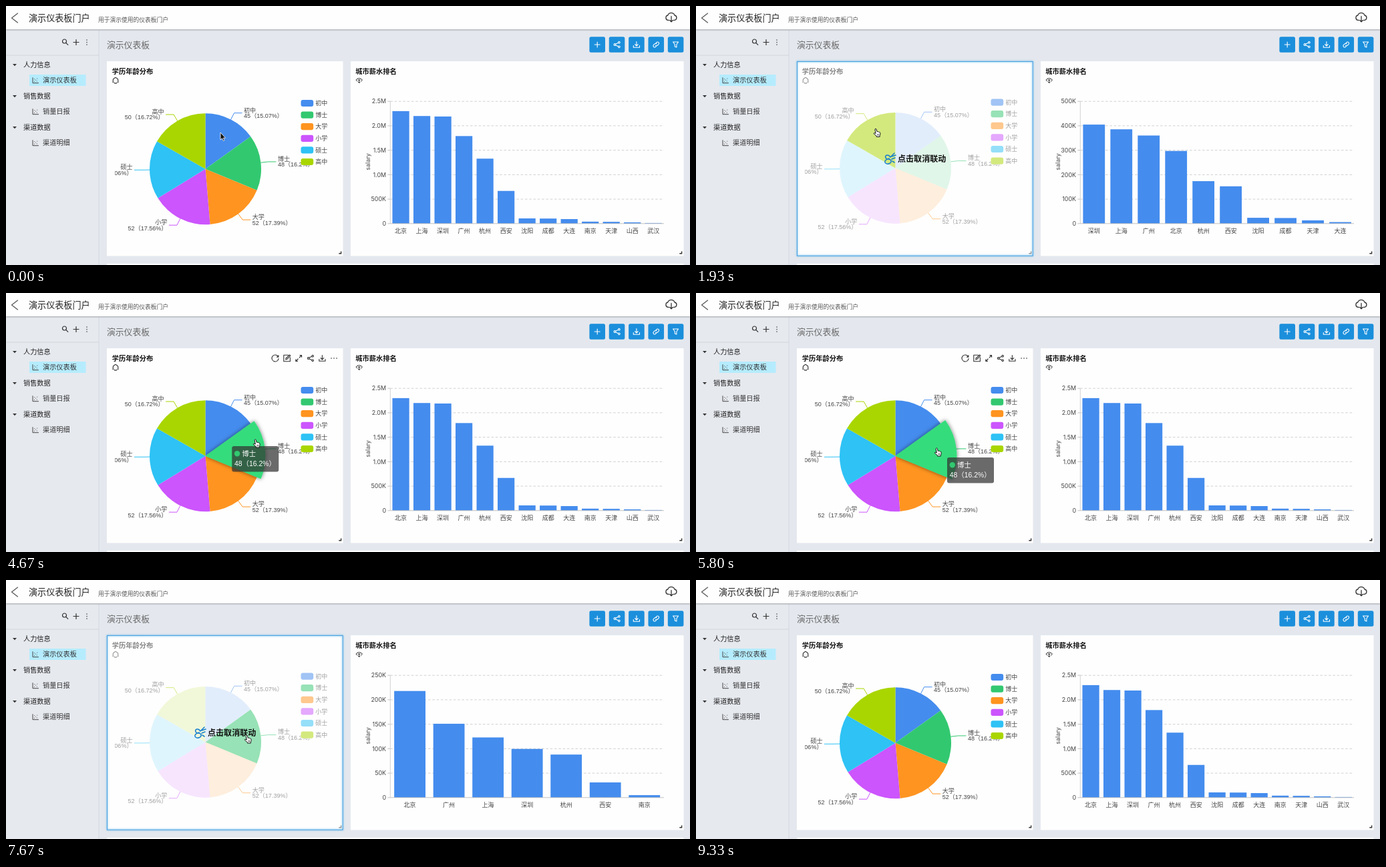
Write an HTML page that moves like this. It is 1024 px wide and 389 px high and loops after 9.54 s.

```html
<!DOCTYPE html>
<html lang="zh-CN">
<head>
<meta charset="utf-8">
<title>演示仪表板</title>
<style>
html, body { margin: 0; width: 100%; height: 100%; overflow: hidden; background: #e4e8ee; }
svg { display: block; width: 100%; height: 100%; font-family: "Liberation Sans", "Noto Sans CJK SC", "Noto Sans CJK", sans-serif; }
.axis { font-family: Inter, "Noto Sans CJK SC", "Noto Sans CJK", sans-serif; }
</style>
</head>
<body>
<svg id="stage" viewBox="0 0 1024 389">
  <defs>
    <filter id="soft" x="-30%" y="-30%" width="160%" height="160%"><feDropShadow dx="0" dy="0" stdDeviation="3" flood-color="#000" flood-opacity=".55"/></filter>
    <filter id="glow" x="-5%" y="-5%" width="110%" height="110%"><feDropShadow dx="0" dy="0" stdDeviation="1.6" flood-color="#1b8fdc" flood-opacity=".8"/></filter>
    <filter id="drop" x="-5%" y="-30%" width="110%" height="180%"><feDropShadow dx="0" dy="1" stdDeviation="1.2" flood-color="#000" flood-opacity=".3"/></filter>
    <clipPath id="chartClip"><rect x="163" y="125" width="332" height="245"/></clipPath>
  </defs>
</svg>
<script>
const LOOP = 9540;
const NS = 'http://www.w3.org/2000/svg';
const svg = document.getElementById('stage');

function el(tag, attrs, parent = svg) {
  const node = document.createElementNS(NS, tag);
  set(node, attrs);
  return parent.appendChild(node);
}
function set(node, attrs) {
  for (const k in attrs) node.setAttribute(k, attrs[k]);
}
const group = (parent, attrs = {}) => el('g', attrs, parent);
const box = (x, y, width, height, fill, parent, more = {}) => el('rect', { x, y, width, height, fill, ...more }, parent);
const show = (node, on) => set(node, { display: on ? 'inline' : 'none' });

// y is the vertical middle of the text
function text(str, x, y, size, fill, parent, more = {}) {
  const node = el('text', { x, y: y + size * 0.36, 'font-size': size, fill, ...more }, parent);
  node.textContent = str;
  return node;
}
function icon(d, x, y, color, parent, width = 1.1, more = {}) {
  return el('path', { d, transform: `translate(${x} ${y})`, fill: 'none', stroke: color, 'stroke-width': width,
    'stroke-linecap': 'round', 'stroke-linejoin': 'round', ...more }, parent);
}

const ICONS = {
  plus: 'M-4 0H4M0 -4V4',
  share: 'M-2.2 -.7L2.3 -2.8M-2.2 .7L2.3 2.8M-4.5 0a1.4 1.4 0 1 0 2.8 0a1.4 1.4 0 1 0 -2.8 0M2 -3.3a1.3 1.3 0 1 0 2.6 0a1.3 1.3 0 1 0 -2.6 0M2 3.3a1.3 1.3 0 1 0 2.6 0a1.3 1.3 0 1 0 -2.6 0',
  load: 'M0 -4.5V2M-2.3 -.3L0 2L2.3 -.3M-4.6 1.5V4.3H4.6V1.5',
  link: 'M-.8 1.2a2 2 0 0 0 2.9 0l1.6 -1.6a2 2 0 0 0 -2.9 -2.9l-.8 .8M.8 -1.2a2 2 0 0 0 -2.9 0l-1.6 1.6a2 2 0 0 0 2.9 2.9l.8 -.8',
  funnel: 'M-4 -4H4L1.3 -.2V4L-1.3 3V-.2Z',
  reload: 'M4.4 -2.4A5 5 0 1 0 5 .6M4.9 -4.4V-1.9H2.4',
  edit: 'M2 -4.8H-4.8V4.8H4.8V-1.2M-1.8 2L-1.5 0L4 -5L5.2 -3.8L0 1.5Z',
  expand: 'M1 -1L4.4 -4.4M1.8 -4.4H4.4V-1.8M-1 1L-4.4 4.4M-1.8 4.4H-4.4V1.8',
  chart: 'M-4 -4V4H4.5M-1.6 1.6h.1M.3 -.6h.1M2.2 1.3h.1M2.8 -2.6h.1M-1.4 -2h.1'
};

// Page frame
box(0, 0, 1024, 389, '#e4e8ee');
box(0, 36, 139, 353, '#e6e9ee');
box(138.5, 36, 1, 353, '#d3d7dd');
box(0, 73.5, 139, 1, '#d3d7dd');
box(0, -4, 1024, 39, '#fefefe', svg, { filter: 'url(#drop)' });
icon('M4.5 -7L-4.5 0L4.5 7', 13, 18, '#555', svg, 1.2);
text('演示仪表板门户', 34, 18.5, 13.1, '#222');
text('用于演示使用的仪表板门户', 138, 20.8, 8.75, '#555');
icon('M-3.5 4.3H-4.6A3.7 3.7 0 0 1 -5.2 -3A5.4 5.4 0 0 1 5 -3A3.7 3.7 0 0 1 4.6 4.3H3.5M0 -1.5V6.5M-2.2 4.5L0 6.7L2.2 4.5', 996, 17, '#333', svg, 1.3);

// Sidebar
icon('M-4 -1a3 3 0 1 0 6 0a3 3 0 1 0 -6 0M1.3 1.3L4.3 4.3', 88.5, 54, '#333', svg, 1.2);
icon(ICONS.plus, 105, 54.5, '#333', svg, 1.2);
icon('M0 -3.5v.1M0 0v.1M0 3.5v.1', 121, 54.5, '#444', svg, 1.6);
box(35, 103, 84.5, 17, '#b5ecfd');
[['人力信息', '演示仪表板'], ['销售数据', '销量日报'], ['渠道数据', '渠道明细']].forEach(([head, item], i) => {
  const y = 88 + 47 * i;
  el('path', { d: `M10 ${y - 1}h6l-3 3.2z`, fill: '#333' });
  text(head, 26, y, 10.2, '#222', svg, { 'font-weight': 500 });
  icon(ICONS.chart, 44, y + 23.7, '#444', svg, 1);
  text(item, 55, y + 23.7, 10.2, '#333');
});

// Content header
text('演示仪表板', 151, 58, 12.8, '#666');
['plus', 'share', 'load', 'link', 'funnel'].forEach((name, i) => {
  const x = 885.2 + 29.35 * i;
  box(x - 11.8, 46.3, 23.6, 23.4, '#1b8fdc', svg, { rx: 2.5 });
  icon(ICONS[name], x, 58, '#fff');
});

// Panels
const leftCard = box(151, 83, 353.5, 292.5, '#fefefe');
box(516, 83, 498.5, 292.5, '#fefefe');
box(151, 387, 863.5, 2, '#fefefe');
const left = group(svg), right = group(svg);
function panelTitle(str, x, parent, edge) {
  text(str, x, 98, 10.25, '#111', parent, { 'font-weight': 700 });
  el('path', { d: `M${edge} 368.5v4h-4v-1.4h2.6v-2.6z`, fill: '#333' }, parent);
}
panelTitle('学历年龄分布', 158.8, left, 502.3);
panelTitle('城市薪水排名', 523.3, right, 1012.3);
icon('M-3.7 1.2A4 4 0 0 1 -1.2 -3.3M1.2 -3.3A4 4 0 0 1 3.7 1.2M2 4A4 4 0 0 1 -2 4M-.8 -4h1.6M-4.4 2.6h1.4M3 2.6h1.4', 164, 111.5, '#333', left, 1.2);
icon('M-2.6 -2.2L-4.8 -.3L-2.6 1.6M2.6 -2.2L4.8 -.3L2.6 1.6M-2.6 -2.2Q0 -4 2.6 -2.2M-1.2 -.3h2.4M0 -1V4M-1.3 2.7L0 4L1.3 2.7', 528.7, 111.5, '#333', right, 1);

const tools = group(svg);
['reload', 'edit', 'expand', 'share', 'load'].forEach((name, i) => icon(ICONS[name], 403 + 17.6 * i, 98, '#333', tools));
icon('M-4 0h.1M0 0h.1M4 0h.1', 491, 98, '#333', tools, 1.6);

// Pie
const CX = 298.5, CY = 244.8, R = 83.5;
const slices = [
  ['初中', 45, 15.07, '#448cee', '#4a9aff'],
  ['博士', 48, 16.2, '#32c870', '#36dc7b'],
  ['大学', 52, 17.39, '#ff9420', '#ffa323'],
  ['小学', 52, 17.56, '#cc55fd', '#e05eff'],
  ['硕士', 51, 17.06, '#2ec2f5', '#33d5ff'],
  ['高中', 50, 16.72, '#a9d600', '#baeb00']
].map(([name, count, pct, color, bright]) => ({ name, pct, color, bright, value: `${count}（${pct}%）` }));
const pie = group(group(left, { 'clip-path': 'url(#chartClip)' }));
const polar = (a, r) => [CX + r * Math.sin(a), CY - r * Math.cos(a)];
const wedge = (s, r) => `M${CX} ${CY}L${polar(s.from, r)}A${r} ${r} 0 0 1 ${polar(s.to, r)}Z`;

let angle = 0;
slices.forEach(s => {
  s.from = angle;
  s.to = angle += s.pct / 100 * 2 * Math.PI;
  s.node = el('path', { d: wedge(s, R), fill: s.color }, pie);
});
slices.forEach((s, i) => {
  const mid = (s.from + s.to) / 2, side = i < 3 ? 1 : -1;
  const [x, y] = polar(mid, 94.5);
  el('path', { d: `M${polar(mid, R)}L${x} ${y}h${12 * side}`, fill: 'none', stroke: s.color }, pie);
  const anchor = { 'text-anchor': side > 0 ? 'start' : 'end' };
  text(s.name, x + 14.5 * side, y - 4.4, 9.05, '#444', pie, anchor);
  text(s.value, x + 14.5 * side, y + 4.2, 9.05, '#444', pie, anchor);
});
const lifted = el('path', { filter: 'url(#soft)' }, pie);
slices.forEach((s, i) => {
  const y = 146 + 17.6 * i;
  box(441.5, y - 5.1, 18.7, 10.2, s.color, pie, { rx: 3 });
  text(s.name, 463.3, y, 9, '#444', pie);
});

// Bars
const FLOOR = 326.8, HEIGHT = 183.6, X0 = 575.3, WIDE = 409.7;
const chart = group(right, { class: 'axis' });
for (let i = 0; i <= 5; i++) {
  const y = FLOOR - HEIGHT * i / 5;
  if (i) el('path', { d: `M${X0} ${y}H${X0 + WIDE}`, stroke: '#ccc', 'stroke-width': .9, 'stroke-dasharray': '3.6 2.7' }, chart);
  el('path', { d: `M${X0 - 4} ${y}h4`, stroke: '#bbb', 'stroke-width': .9 }, chart);
}
el('path', { d: `M${X0} ${FLOOR - HEIGHT}V${FLOOR}`, stroke: '#ccc', 'stroke-width': .9 }, chart);
text('salary', 0, 0, 8.9, '#444', chart, { 'text-anchor': 'middle', transform: 'translate(542 234) rotate(-90)' });

const charts = [
  [2500, ['0', '500K', '1.0M', '1.5M', '2.0M', '2.5M'], '北京 上海 深圳 广州 杭州 西安 沈阳 成都 大连 南京 天津 山西 武汉',
    [2300, 2200, 2190, 1790, 1328, 668, 106, 103, 92, 40, 36, 25, 12]],
  [500, ['0', '100K', '200K', '300K', '400K', '500K'], '深圳 上海 广州 北京 杭州 西安 沈阳 成都 天津 大连',
    [462, 440, 411, 339, 198, 174, 27, 26, 15, 7]],
  [250, ['0', '50K', '100K', '150K', '200K', '250K'], '北京 广州 上海 深圳 杭州 西安 南京',
    [218, 151, 123, 99.5, 88, 31, 5]]
].map(([max, ticks, cities, values]) => {
  const g = group(chart), step = WIDE / values.length;
  ticks.forEach((s, i) => text(s, 569, FLOOR - HEIGHT * i / 5, 8.9, '#444', g, { 'text-anchor': 'end' }));
  const bars = cities.split(' ').map((city, i) => {
    const x = X0 + step * (i + .5);
    text(city, x, 337.3, 9, '#444', g, { 'text-anchor': 'middle' });
    return { h: values[i] / max * HEIGHT, node: box(x - step * .4, FLOOR, step * .8, 0, '#448cee', g) };
  });
  return { g, bars };
});
el('path', { d: `M${X0} ${FLOOR}h${WIDE}`, stroke: '#bbb', 'stroke-width': .9 }, chart);

// Link overlay, tooltip and pointer
const overlay = group(svg);
box(151.4, 83.4, 352.8, 291.8, 'none', overlay, { stroke: '#3c9ce2', filter: 'url(#glow)' });
icon('M1 -2C-2 -7 -8 -5 -6 -1C-5 2 1 0 2 3C3 8 -5 10 -7 6C-8 3 -4 1 -1 0M1 -2L7 -8M3 1L8 -1M4 4L7 6M3 -3L9 -5', 290, 229, '#1b80d0', overlay, 1.6);
text('点击取消联动', 302, 229.3, 12.05, '#111', overlay, { 'font-weight': 700 });

const tip = group(svg);
const tipBox = box(0, 0, 75, 38.6, 'rgba(50,50,50,.72)', tip, { rx: 3 });
const tipDot = el('circle', { cx: 7.8, cy: 11.3, r: 4.2 }, tip);
const tipName = text('', 15, 11.3, 10.4, '#fff', tip);
const tipValue = text('', 3.8, 26.5, 10.4, '#fff', tip);

const pointer = group(svg);
const arrow = el('path', { d: 'M-1 -2V9L1.5 6.8L3.3 10.5L5 9.7L3.3 6.2H6.6Z', fill: '#111', stroke: '#fff', 'stroke-width': .8 }, pointer);
const hand = el('path', { d: 'M-2.6 -5.6Q-1.6 -6.8 -.8 -5.5L.2 -1.7Q1.2 -2.5 1.9 -1.5Q3 -2 3.5 -.9Q4.7 -1.2 5 .2Q5.4 2.6 4.4 4.2V6H-.6V4.8L-4.6 1.3Q-4.6 -.1 -3 .3L-1.6 1.1L-2.8 -4.6Z',
  fill: '#fff', stroke: '#111', 'stroke-linejoin': 'round' }, pointer);
icon('M1 2.2V4M2.6 2.2V4', 0, 0, '#111', pointer, .7);

// Timeline
const path = [[0, 322, 192], [120, 322, 192], [500, 306, 194], [900, 270, 190], [1900, 270, 190], [2500, 284, 198], [3300, 298, 203],
  [3700, 298, 203], [3950, 300, 228], [4130, 300, 228], [4470, 324, 222], [4670, 375, 226], [5000, 366, 237], [5400, 362, 239],
  [7850, 362, 239], [8130, 374, 239], [8300, 378, 225], [8680, 392, 20]];
const links = [[1600, 4080, 5], [5870, 7960, 1]];
const hovers = [[140, 620, 0], [620, 1600, 5], [4250, 4550, 0], [4550, 5870, 1], [8190, 8370, 1]];
const scenes = [[-1000, 0], [1680, 1], [4140, 0], [5960, 2], [8041, 0]];
const GROW = 500, LIFT = 240;

const clamp = v => Math.max(0, Math.min(1, v));
const easeOut = (p, n) => 1 - (1 - clamp(p)) ** n;
const during = (list, t) => list.find(([a, b]) => t >= a && t < b);
function pointerAt(t) {
  const i = path.findIndex(k => k[0] > t);
  if (i < 1) return (i ? path[path.length - 1] : path[0]).slice(1);
  const [ta, xa, ya] = path[i - 1], [tb, xb, yb] = path[i], p = (t - ta) / (tb - ta);
  return [xa + (xb - xa) * p, ya + (yb - ya) * p];
}

function draw(t) {
  const link = during(links, t), hover = during(hovers, t);
  set(left, { opacity: link ? .5 : 1 });
  set(pie, { transform: `translate(0 ${link ? -1.4 : 0})` });
  show(overlay, link);
  set(leftCard, { fill: '#fefefe' });
  show(tools, !link && t >= 140 && t < 8560);
  slices.forEach((s, i) => set(s.node, { opacity: link && link[2] !== i ? .29 : 1 }));

  show(lifted, hover);
  show(tip, hover);
  if (hover) {
    const s = slices[hover[2]];
    set(lifted, { d: wedge(s, R + 8.5 * easeOut((t - hover[0]) / LIFT, 2)), fill: s.bright });
    const [x, y] = pointerAt(t - 200);
    set(tip, { transform: `translate(${x + 14} ${y + 8})` });
    set(tipBox, { width: s.pct === 16.2 ? 70 : 75 });
    set(tipDot, { fill: s.color });
    tipName.textContent = s.name;
    tipValue.textContent = s.value;
  }

  const [start, current] = scenes.filter(s => s[0] <= t).pop();
  const grown = easeOut((t - start) / GROW, 3);
  charts.forEach((c, i) => {
    show(c.g, i === current);
    if (i === current) c.bars.forEach(b => set(b.node, { y: FLOOR - b.h * grown, height: b.h * grown }));
  });

  const [x, y] = pointerAt(t), pointing = t >= 140 && t < 8370;
  set(pointer, { transform: `translate(${x} ${y})` });
  show(pointer, t < 8680);
  show(arrow, !pointing);
  show(hand, pointing);
  show(pointer.lastChild, pointing);
}

const begin = performance.now();
function tick() {
  draw((performance.now() - begin) % LOOP);
  requestAnimationFrame(tick);
}
tick();
</script>
</body>
</html>
```
